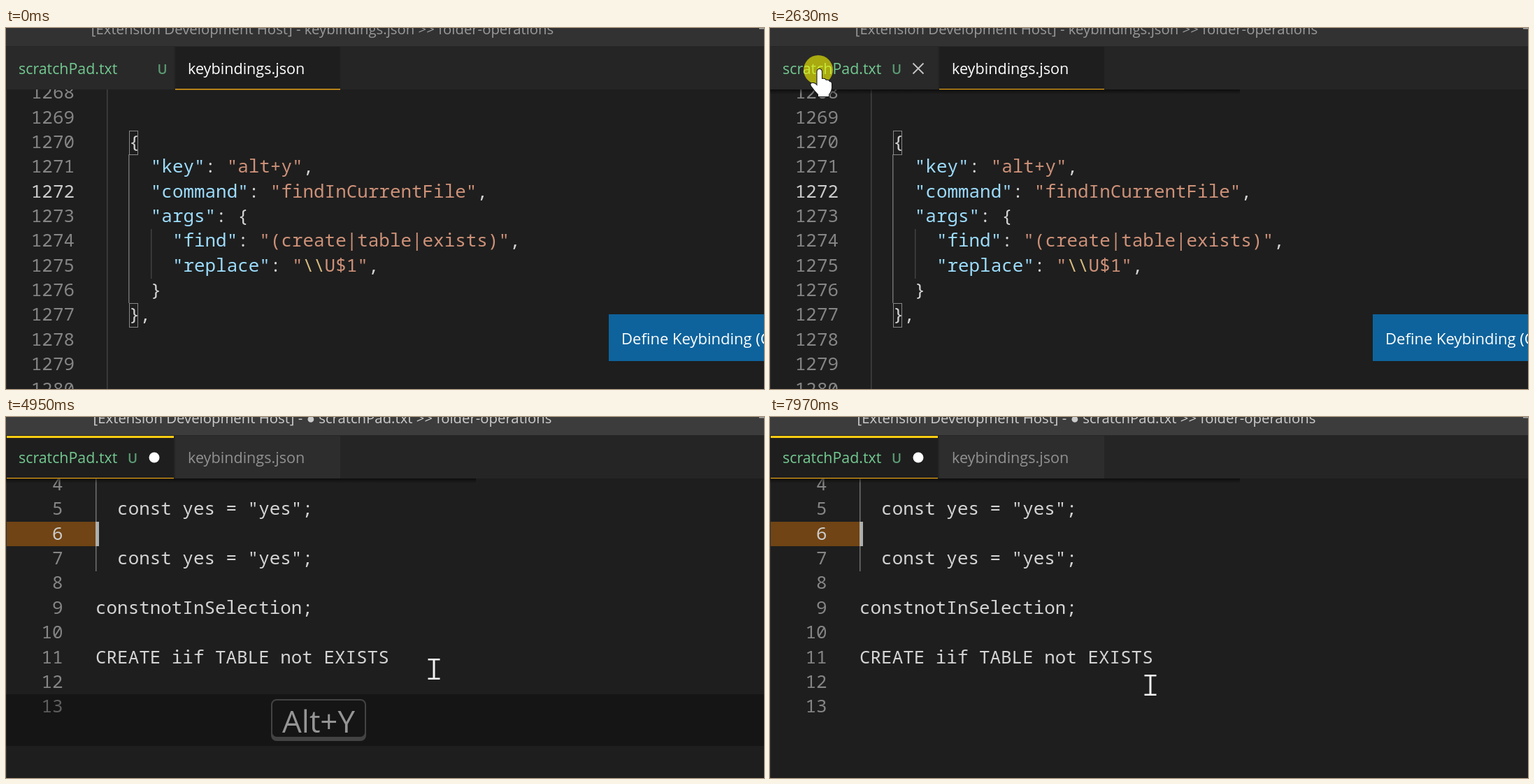
An HTML page with a canvas for the animation above (8 s loop, 1084 by 517 pixels).

```html
<!DOCTYPE html>
<html lang="en">
<head>
<meta charset="utf-8">
<title>Find in current file</title>
<style>
  html, body { margin: 0; width: 100%; height: 100%; overflow: hidden; background: #1e1e1e; }
  canvas { display: block; }
</style>
</head>
<body>
<canvas id="stage" width="1084" height="517"></canvas>
<script>
const W = 1084, H = 517, LOOP = 8000;
const ctx = document.getElementById('stage').getContext('2d');
const MONO = '25.92px "Noto Sans Mono", monospace';
const ui = (size, weight = 400) => `${weight} ${size}px "Open Sans", "Noto Sans", sans-serif`;
const CHAR = 15.55, ROW = 35.35;
const TEXT = '#d4d4d4', KEY = '#9cdcfe', STR = '#ce9178', ESC = '#d7ba7d';
const NUM = '#858585', NUM_ACTIVE = '#cccccc', GREEN = '#73c991', GOLD = '#e8a317';

// Milestones in ms.
const APPEAR = 670, PRESS = 2530, OPEN = 2750, RELEASE = 2830;
const EDIT = 4790, KEY_END = 5640;
const STEP = 76.84, BLINK = 530;

// Pointer glides; each starts where the previous one ended.
const GLIDES = [
  { from: 670, to: 1440, x: 71, y: 70 },
  { from: 1440, to: 1600, x: 67, y: 61 },
  { from: 1840, to: 1990, x: 69, y: 59 },
  { from: 2900, to: 3400, x: 612, y: 361 },
  { from: 5730, to: 5810, x: 596, y: 372 },
  { from: 6110, to: 6430, x: 249.5, y: 394 },
  { from: 6430, to: 6810, x: 150, y: 384 },
  { from: 7060, to: 7970, x: 544, y: 384 }
];

const JSON_LINES = [
  '  {',
  '    "key": "alt+y",',
  '    "command": "findInCurrentFile",',
  '    "args": {',
  '      "find": "(create|table|exists)",',
  '      "replace": "\\\\U$1",',
  '    }',
  '  },'
];
// Later rules paint over earlier ones.
const SYNTAX = [[/"[^"]*"/g, STR], [/"\w+"(?=:)/g, KEY], [/\\\\/g, ESC]];

const snap = t => APPEAR + STEP * Math.floor((t - APPEAR) / STEP + 0.1);
const easeOut = (u, power) => 1 - (1 - u) ** power;

function pointerAt(t) {
  let x = 595, y = 474;
  for (const g of GLIDES) {
    if (t <= g.from) break;
    const u = Math.min(1, (t - g.from) / (g.to - g.from));
    x += (g.x - x) * easeOut(u, 1.3);
    y += (g.y - y) * easeOut(u, 2);
  }
  return { x, y };
}

function caretOn(t) {
  const reset = t >= EDIT ? EDIT - 60 : OPEN - 10;
  return Math.floor((t - reset) / BLINK) % 2 === 0;
}

function rect(x, y, w, h, color) {
  ctx.fillStyle = color;
  ctx.fillRect(x, y, w, h);
}

function text(str, x, y, font, color, align = 'left') {
  ctx.font = font;
  ctx.fillStyle = color;
  ctx.textAlign = align;
  ctx.fillText(str, x, y);
}

function codeLine(line, x, y) {
  const colors = Array(line.length).fill(TEXT);
  for (const [pattern, color] of SYNTAX) {
    for (const m of line.matchAll(pattern)) colors.fill(color, m.index, m.index + m[0].length);
  }
  colors.forEach((color, i) => text(line[i], x + i * CHAR, y, MONO, color));
}

function disc(x, y, r, color) {
  ctx.fillStyle = color;
  ctx.beginPath();
  ctx.arc(x, y, r, 0, Math.PI * 2);
  ctx.fill();
}

function drawTitle(open, dirty) {
  const file = open ? (dirty ? '● ' : '') + 'scratchPad.txt' : 'keybindings.json';
  rect(0, 0, W, 26, open ? '#3c3c3c' : '#323233');
  text(`[Extension Development Host] - ${file} >> folder-operations`, 452.5, 9,
    ui(20.33), open ? '#cccccc' : '#999999', 'center');
  rect(1077, 0, 7, 1.5, '#aaaaaa');
}

function drawClose(x, y, r) {
  ctx.strokeStyle = '#c5c5c5';
  ctx.lineWidth = 1.8;
  ctx.beginPath();
  ctx.moveTo(x - r, y - r); ctx.lineTo(x + r, y + r);
  ctx.moveTo(x + r, y - r); ctx.lineTo(x - r, y + r);
  ctx.stroke();
}

function drawTabs(open, dirty, hover) {
  rect(0, 26, W, 62, '#252526');
  rect(0, 27, 240, 61, open ? '#1e1e1e' : '#292929');
  rect(242, 27, 236, 61, open ? '#2d2d2d' : '#1e1e1e');
  rect(open ? 1 : 242, 87, open ? 239 : 236, 1.5, GOLD);
  if (dirty) rect(1, 27, 239, 3, '#fccc12');

  text('scratchPad.txt', 18, 66, ui(21.4), GREEN);
  text('keybindings.json', 260, 66, ui(21.6), open ? '#919191' : '#ffffff');
  text('U', dirty || hover ? 181 : 223.5, 66, ui(19, 600), '#5a9a72', 'center');
  if (dirty) disc(212, 58, 7.5, '#ffffff');
  else if (hover) drawClose(212, 58, 7.5);
}

function drawJson() {
  const base = n => 172 + (n - 1270) * ROW;
  rect(144, 88, 1.5, H - 88, '#404040');
  rect(175, 181, 1.5, 213, '#707070');
  rect(207, 288, 1.5, 71, '#404040');
  ctx.strokeStyle = '#888888';
  ctx.lineWidth = 1;
  for (const y of [147.5, 394.5]) ctx.strokeRect(176.5, y, 12, 34);
  for (let n = 1268; n <= 1280; n++) {
    text(n, 98, base(n), MONO, n === 1272 ? NUM_ACTIVE : NUM, 'right');
  }
  JSON_LINES.forEach((line, i) => codeLine(line, 144.6, base(1270 + i)));
  rect(862, 410, W - 862, 67, '#0e639c');
  text('Define Keybinding (Ctrl+K Ctrl+K)', 880, 452.5, ui(22), '#ffffff');
}

function drawScratch(dirty, caret) {
  const base = n => 140.4 + (n - 5) * ROW;
  const rows = {
    5: '  const yes = "yes";',
    7: '  const yes = "yes";',
    9: 'constnotInSelection;',
    11: 'create iif table not exists'
  };
  if (dirty) rows[11] = rows[11].replace(/create|table|exists/g, m => m.toUpperCase());
  rect(1, 150, 127, 35, '#704414');
  rect(128, 88, 1.5, 133, '#707070');
  for (let n = 4; n <= 13; n++) {
    text(n, 81.5, base(n), MONO, n === 6 ? NUM_ACTIVE : NUM, 'right');
    if (rows[n]) text(rows[n], 128, base(n), MONO, TEXT);
  }
  if (caret) rect(128, 150, 5, 35, '#aeafad');
}

function drawShadow() {
  const g = ctx.createLinearGradient(0, 88, 0, 95);
  g.addColorStop(0, 'rgba(0,0,0,.55)');
  g.addColorStop(1, 'rgba(0,0,0,0)');
  rect(0, 88, 672, 7, g);
}

function drawKeycap(alpha) {
  ctx.globalAlpha = alpha;
  rect(0, 397, W, 74, 'rgba(0,0,0,.5)');
  ctx.fillStyle = '#636363';
  ctx.beginPath();
  ctx.roundRect(379, 404, 136, 60, 8);
  ctx.roundRect(381, 406, 132, 52, 6);
  ctx.fill('evenodd');
  text('Alt+Y', 447, 452, ui(43.8), '#eeeeee', 'center');
  ctx.globalAlpha = 1;
}

const HAND = new Path2D('M9.5 4Q9.5 0 12.5 0Q16 0 16 4V14Q21 13 22 16Q26 15 27 18' +
  'Q30 18 30 21V27Q29 33 26 36V39H11V36Q6 31 1 24Q-1 20 3 20Q7 20 9.5 24Z');

function drawPointer({ x, y }, hand) {
  if (hand) {
    ctx.save();
    ctx.translate(x - 11, y);
    ctx.strokeStyle = '#151515';
    ctx.lineWidth = 2;
    ctx.stroke(HAND);
    ctx.fillStyle = '#ffffff';
    ctx.fill(HAND);
    ctx.restore();
    return;
  }
  rect(x - 1.5, y - 14, 3, 28, '#f2f2f2');
  for (const dy of [-15, 12.5]) rect(x - 8.5, y + dy, 17, 2.5, '#f2f2f2');
}

function draw(t) {
  const s = snap(t);
  const open = t >= OPEN, dirty = t >= EDIT, visible = s >= APPEAR;
  const pointer = pointerAt(s);
  const onTab = visible && pointer.y < 88;

  rect(0, 0, W, H, '#1e1e1e');
  if (open) drawScratch(dirty, caretOn(t));
  else drawJson();
  rect(0, 88, 1, H - 88, '#303030');
  drawTabs(open, dirty, onTab && pointer.x < 241);
  drawTitle(open, dirty);
  if (t >= PRESS) drawShadow();
  if (dirty && t < KEY_END) drawKeycap(Math.min(1, (s - 4660) / 400));
  if (t >= PRESS && t < RELEASE) disc(69, 60, 21, 'rgba(255,255,0,.6)');
  if (visible) drawPointer(pointer, onTab);
}

const start = performance.now();
function tick() {
  draw((performance.now() - start) % LOOP);
  requestAnimationFrame(tick);
}
tick();
</script>
</body>
</html>
```
